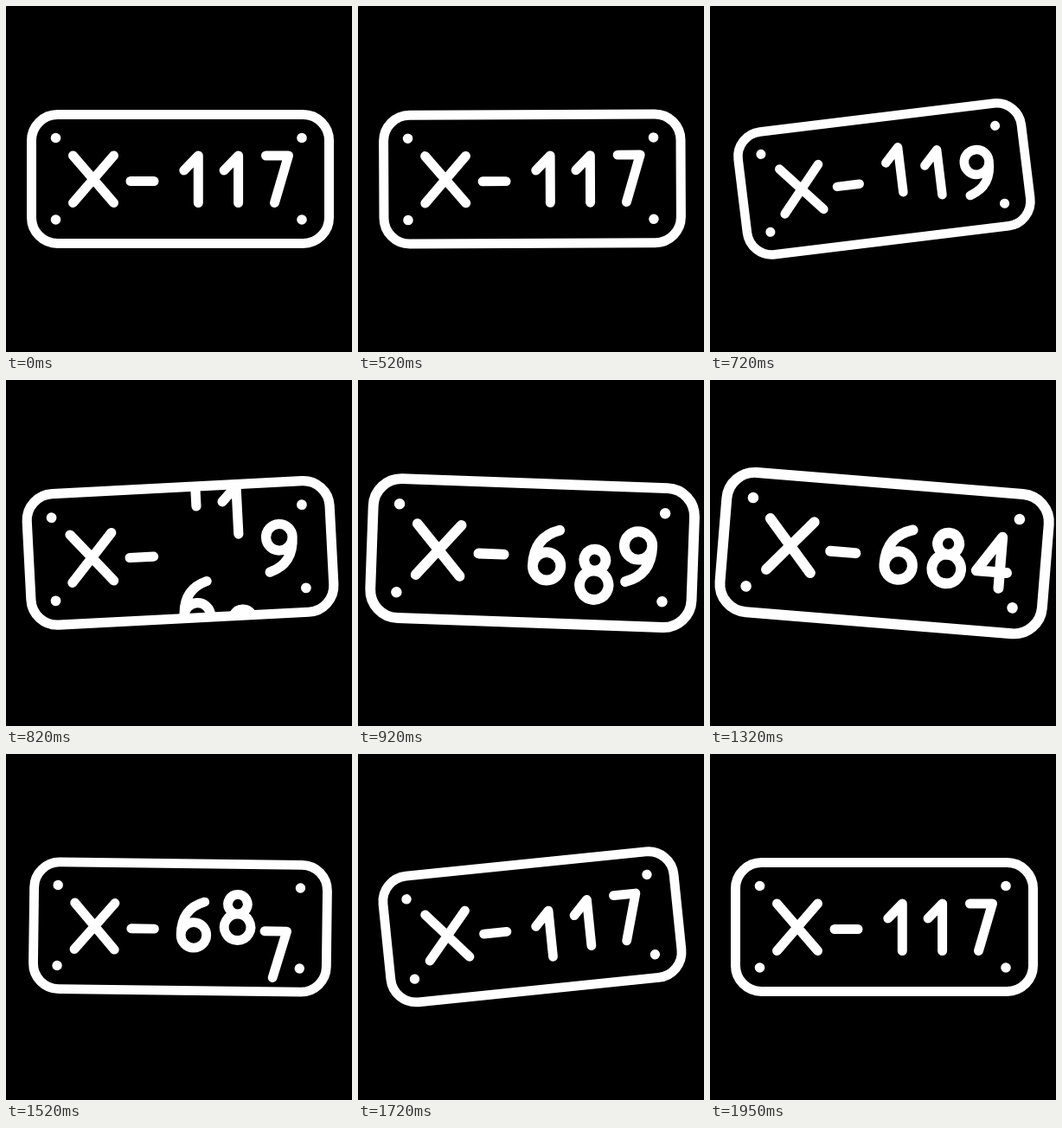
Animation of 400x400 px, one loop 1.97 s. Source, as an HTML page:

```html
<!DOCTYPE html>
<html lang="en">
<head>
<meta charset="utf-8">
<title>Number plate</title>
<style>
  html, body { margin: 0; width: 100%; height: 100%; overflow: hidden; background: #000; }
  svg { display: block; width: 100vw; height: 100vh; }
  .line { fill: none; stroke: #fff; stroke-width: 11; stroke-linecap: round; stroke-linejoin: round; }
  .dot { fill: #fff; }
</style>
</head>
<body>
<svg viewBox="0 0 400 400">
  <defs>
    <clipPath id="window"><rect x="29.5" y="125.5" width="344" height="149" rx="30"/></clipPath>
  </defs>
  <g id="plate">
    <rect class="line" x="29.5" y="125.5" width="344" height="149" rx="30"/>
    <g class="dot">
      <circle cx="57.5" cy="152.5" r="5.8"/>
      <circle cx="342" cy="152.5" r="5.8"/>
      <circle cx="57.5" cy="247" r="5.8"/>
      <circle cx="342" cy="247" r="5.8"/>
    </g>
    <path class="line" d="M77.5 173L124.5 227.5M124.5 173L77.5 227.5M144 202.5H171"/>
    <g id="digits" class="line" clip-path="url(#window)"></g>
  </g>
</svg>
<script>
const LOOP = 1970, START = 520, STEP = 25, PITCH = 140;

// Glyphs are drawn around their column's x, at their resting height.
const GLYPHS = {
  1: 'M-11.5 190L5 173V227.5',
  4: 'M11 227.5V173L-14 210.5H18.5',
  6: 'M12.5 173Q-15 181 -15 212A15 15 0 1 0 15 212A15 15 0 1 0 -15 212',
  7: 'M-14 173H12L-4 227.5',
  8: 'M5 196A11.5 11.5 0 1 1 5.01 196ZM5 196A15.5 15.5 0 1 0 5.01 196Z',
  9: 'M-12.5 227Q15 219 15 188A15 15 0 1 0 -15 188A15 15 0 1 0 15 188'
};

// Each roll is [start, end] in ms and brings in the next digit from below.
const COLUMNS = [
  { x: 217.3, digits: '161', rolls: [[681, 936], [1498, 1763]] },
  { x: 263.6, digits: '181', rolls: [[719, 984], [1472, 1737]] },
  { x: 314.5, digits: '7947', rolls: [[512, 748], [920, 1185], [1335, 1600]] }
];

const ANGLE = [[495, 0], [710, -7], [920, 2.05], [1020, 4.3], [1150, 5],
               [1320, 4.64], [1520, 0.72], [1745, -6], [1945, 0]];
const SCALE = [[495, 1], [705, 0.957], [920, 1.08], [1020, 1.094], [1150, 1.1],
               [1320, 1.086], [1520, 0.985], [1600, 0.975], [1945, 1]];

const clamp = v => Math.min(1, Math.max(0, v));
const smooth = v => v * v * (3 - 2 * v);

// Monotone cubic curve through the keys, flat at each turning point.
function curve(keys) {
  const slope = i => (keys[i + 1][1] - keys[i][1]) / (keys[i + 1][0] - keys[i][0]);
  const tangents = keys.map((key, i) => {
    if (i === 0 || i === keys.length - 1) return 0;
    const a = slope(i - 1), b = slope(i);
    return a * b > 0 ? 2 * a * b / (a + b) : 0;
  });
  return t => {
    const last = keys.length - 1;
    if (t <= keys[0][0]) return keys[0][1];
    if (t >= keys[last][0]) return keys[last][1];
    const i = keys.findIndex(key => key[0] > t) - 1;
    const [t0, v0] = keys[i], [t1, v1] = keys[i + 1];
    const span = t1 - t0, u = (t - t0) / span, w = 1 - u;
    return v0 + (v1 - v0) * smooth(u) +
      u * w * (w * (tangents[i] * span - (v1 - v0)) - u * (tangents[i + 1] * span - (v1 - v0))) +
      u * w * (v1 - v0) * (w - u);
  };
}

const angle = curve(ANGLE), scale = curve(SCALE);
const plate = document.getElementById('plate');

function add(parent, tag) {
  return parent.appendChild(document.createElementNS('http://www.w3.org/2000/svg', tag));
}

for (const column of COLUMNS) {
  column.node = add(document.getElementById('digits'), 'g');
  [...column.digits].forEach((digit, i) => {
    const path = add(column.node, 'path');
    path.setAttribute('d', GLYPHS[digit]);
    path.setAttribute('transform', `translate(0 ${i * PITCH})`);
  });
}

function draw(time) {
  const t = time < START ? 0 : START + Math.floor((time - START) / STEP) * STEP;
  plate.setAttribute('transform',
    `translate(200 200) rotate(${angle(t)}) scale(${scale(t)}) translate(-200 -200)`);
  for (const { x, rolls, node } of COLUMNS) {
    const turns = rolls.reduce((sum, [a, b]) => sum + smooth(clamp((t - a) / (b - a))), 0);
    node.setAttribute('transform', `translate(${x} ${-turns * PITCH})`);
  }
}

const begin = performance.now();
function tick() {
  draw((performance.now() - begin) % LOOP);
  requestAnimationFrame(tick);
}
tick();
</script>
</body>
</html>
```
